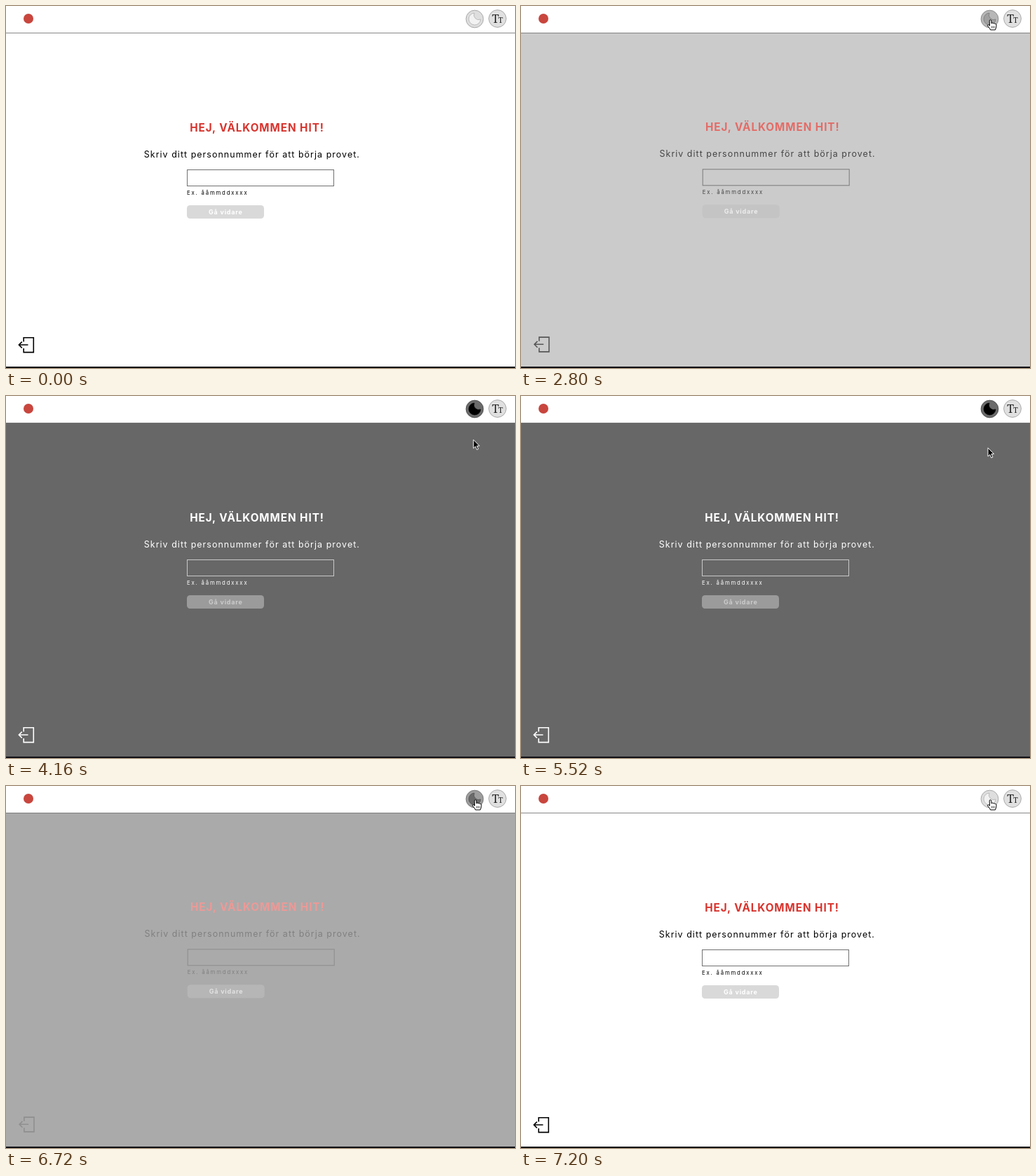
These frames come from a looping animation (726 by 516 pixels, 7.68 s). An HTML page:

```html
<!DOCTYPE html>
<html lang="sv">
<head>
<meta charset="utf-8">
<title>Välkommen</title>
<style>
  html, body { margin: 0; width: 100%; height: 100%; overflow: hidden; background: #fff; }
  svg { display: block; width: 726px; height: 516px; }
  text { font-family: Inter, "Open Sans", sans-serif; white-space: pre; }
  .serif { font-family: "Noto Serif", serif; fill: #222; }
</style>
</head>
<body>
<svg viewBox="0 0 726 516">
  <rect id="page" width="726" height="516"/>
  <rect width="726" height="38" fill="#fff"/>
  <rect id="rule" y="38" width="726" height="1"/>
  <rect y="514" width="726" height="2" fill="#101016"/>
  <circle cx="32" cy="18" r="7" fill="#c8463e"/>

  <circle id="moonDisc" cx="668.5" cy="18.5" r="12.4" stroke-width=".8"/>
  <path id="moon" d="M668 10A8.5 8.5 0 1 0 677 19A6.8 6.8 0 0 1 668 10Z" stroke-width=".7"/>
  <circle cx="701" cy="18" r="12.4" fill="#e0e0e0" stroke="#999" stroke-width=".8"/>
  <text class="serif" x="693.2" y="24" font-size="16">T</text>
  <text class="serif" x="702.2" y="24" font-size="10.5">T</text>

  <g id="content">
    <text id="title" x="262.2" y="179" font-size="15.3" font-weight="700" letter-spacing=".93">HEJ, VÄLKOMMEN HIT!</text>
    <text class="ink" x="196.8" y="216" font-size="12.48" letter-spacing="1.03">Skriv ditt personnummer för att börja provet.</text>
    <rect id="field" x="258.5" y="233.5" width="209" height="23"/>
    <text class="ink" x="258" y="269" font-size="7.8" letter-spacing="1.79">Ex. ååmmddxxxx</text>
    <rect id="button" x="258" y="284" width="110" height="19" rx="4.5"/>
    <text id="label" x="289" y="297.2" font-size="9" font-weight="700" letter-spacing=".78">Gå vidare</text>
    <path id="exit" fill="none" stroke-width="1.6" d="M25.2 478.5V472.8H39.3V493.6H25.2V488M31.5 483H18.5M22.8 478.6L18.4 483L22.8 487.4"/>
  </g>

  <g id="cursor" stroke-linejoin="round">
    <path id="arrow" fill="#000" stroke="#fff" stroke-width="1" d="M0 0V12.2L2.8 9.6L4.8 14.2L6.9 13.3L4.9 8.8H8.6Z"/>
    <g id="hand" fill="#fff" stroke="#000" stroke-width="1">
      <path d="M-1.3 1C-1.3 -.7 1.3 -.7 1.3 1L1.6 5C2 3.7 4 3.8 4.2 5C5 4.2 6.4 4.5 6.6 5.7C7.4 5.2 8.5 5.7 8.5 7L8.3 10L7 14H0L-1 11.8L-4 8.3C-4.6 6.8 -2.8 6.2 -1 8.2Z"/>
      <path fill="none" stroke-width=".7" d="M1.9 8.7V11.5M3.8 8.7V11.5M5.7 8.7V11.5"/>
    </g>
  </g>
</svg>
<script>
const LOOP = 7680, STEP = 80, FADE = 360;
const $ = id => document.getElementById(id);
const inks = document.querySelectorAll('.ink');

// Cursor tip: time, x, y
const path = [
  [320, 545, 530], [880, 635, 174], [960, 635, 174], [1700, 667.5, 22],
  [1800, 667.5, 22], [2080, 669.5, 20], [3600, 669.5, 20], [4400, 666, 74],
  [5500, 666, 74], [6240, 669, 20.5], [6400, 669, 20.5], [6480, 669.5, 20]
];

const clamp = v => Math.min(1, Math.max(0, v));
const smooth = v => v * v * (3 - 2 * v);
const fade = (t, start) => smooth(clamp((t - start) / FADE));
const mix = (a, b, p) => a + (b - a) * p;
const rgb = (from, to, p) => `rgb(${from.map((v, i) => Math.round(mix(v, to[i], p)))})`;
const gray = (a, b, p) => rgb([a, a, a], [b, b, b], p);
const paint = (el, fill, stroke) => {
  if (fill) el.setAttribute('fill', fill);
  if (stroke) el.setAttribute('stroke', stroke);
};

function cursorAt(t) {
  const next = path.findIndex(k => k[0] > t);
  if (next < 0) return path[path.length - 1].slice(1);
  const a = path[next - 1], b = path[next];
  const p = smooth((t - a[0]) / (b[0] - a[0]));
  return [mix(a[1], b[1], p), mix(a[2], b[2], p)];
}

function drawTheme(dark) {
  const inkMix = dark ** 1.2;
  paint($('page'), gray(255, 103, dark));
  paint($('rule'), gray(136, 118, dark));
  paint($('moonDisc'), gray(222, 107, dark), gray(153, 70, dark));
  paint($('moon'), gray(242, 0, dark), gray(170, 0, dark));
  paint($('title'), rgb([216, 52, 46], [255, 255, 255], inkMix));
  paint($('field'), 'none', gray(112, 200, dark * dark));
  paint($('button'), gray(217, 155, dark));
  paint($('label'), gray(255, 203, dark));
  paint($('exit'), null, gray(0, 255, dark));
  inks.forEach(el => paint(el, gray(0, 255, inkMix)));
  // The page sits slightly off its resting place while it dissolves
  const fading = dark > 0 && dark < 1;
  $('content').setAttribute('transform', fading ? 'translate(.7 -.7)' : '');
}

function drawCursor(t) {
  const visible = t >= 400;
  $('cursor').style.display = visible ? '' : 'none';
  if (!visible) return;
  const [x, y] = cursorAt(t);
  const hover = Math.hypot(x - 668.5, y - 18.5) < 12.5;
  $('cursor').setAttribute('transform', `translate(${x} ${y})`);
  $('hand').style.display = hover ? '' : 'none';
  $('arrow').style.display = hover ? 'none' : '';
}

function draw(time) {
  const t = Math.floor((time % LOOP) / STEP) * STEP;
  drawTheme(fade(t, 2659) - fade(t, 6555));
  drawCursor(t);
}

const start = performance.now();
function tick() {
  draw(performance.now() - start);
  requestAnimationFrame(tick);
}
tick();
</script>
</body>
</html>
```
